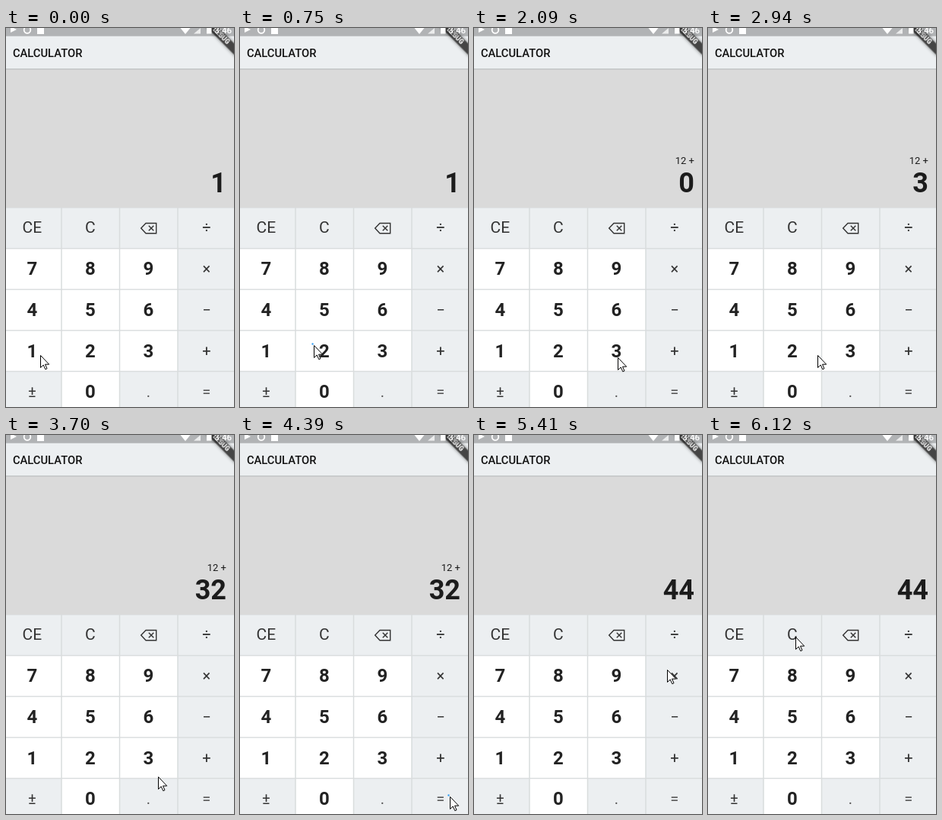
Animation of 300x496 px, one loop 6.29 s. Source, as an HTML page:

```html
<!DOCTYPE html>
<html lang="en">
<head>
<meta charset="utf-8">
<title>Calculator</title>
<style>
  html, body { margin: 0; width: 100%; height: 100%; overflow: hidden; background: #dadada; }
  svg { display: block; width: 300px; height: 496px; font-family: Roboto, sans-serif; }
  .key { text-anchor: middle; fill: #222; }
  .digit { font-size: 24px; font-weight: 700; }
  .clear { font-size: 21px; fill: #333; }
  .op { font-size: 20px; fill: #333; }
  .faint { fill: #555; }
  .display { text-anchor: end; fill: #1c1c1c; }
  .banner { filter: drop-shadow(0 0 2px #0008); }
</style>
</head>
<body>
<svg viewBox="0 0 300 496">
  <rect width="300" height="496" fill="#dadada"/>
  <rect y="52" width="300" height="2.5" fill="#c3c6c7"/>
  <rect width="300" height="53" fill="#eceff1"/>
  <text x="8.9" y="38" font-size="14.75" font-weight="500" fill="#111">CALCULATOR</text>

  <g class="banner" transform="translate(302.5 -9) rotate(45)">
    <rect x="-34" y="22.4" width="68" height="10.2" fill="#454545"/>
    <text y="30.5" font-size="8.4" font-weight="900" text-anchor="middle" fill="#fff">DEBUG</text>
  </g>
  <rect width="300" height="10.7" opacity=".25"/>

  <g fill="#fff">
    <path d="M6 0H10L14 2L6 6Z M41 0H50V8H41Z M229.5 0H242.5L236 8Z M264 0H270.5V7.5H264Z"/>
    <path d="M247 7.5L256 0V7.5Z" opacity=".75"/>
    <circle cx="28" cy="2.5" r="4.3" fill="none" stroke="#fff" stroke-width="1.8"/>
    <text x="297" y="7" font-size="11.5" font-weight="500" text-anchor="end">3:46</text>
  </g>

  <text id="history" class="display" x="290" y="178" font-size="13"></text>
  <text id="value" class="display" x="290" y="215" font-size="36" font-weight="700"></text>

  <rect y="235" width="300" height="261" fill="#d9dcdd"/>
  <g id="keys"></g>
  <path d="M177.7 262L184 255.500H197.700V268.700H184Z M187.800 258.700L194.300 265.300M194.300 258.700L187.800 265.300"
        fill="none" stroke="#333" stroke-width="1.4"/>
  <clipPath id="keyClip"><rect id="clipRect" width="75" height="52.2"/></clipPath>
  <circle id="splash" fill="#2196f3" clip-path="url(#keyClip)"/>
  <path id="cursor" d="M.5 .5V16.5L4.2 13L6.8 18.7L9 17.7L6.5 12.2H11.7Z"
        fill="#fff" stroke="#000" stroke-linejoin="round"/>
</svg>
<script>
const LOOP = 6290, COLS = 4, DISPLAY_DELAY = 140;
const labels = ["CE", "C", "", "÷", ..."789×456−123+±0.="];
const isDigit = label => /\d/.test(label);
const mix = (a, b, p) => a + (b - a) * p;
const el = id => document.getElementById(id);

function setAttributes(id, values) {
  for (const name in values) el(id).setAttribute(name, values[name]);
}

// Pointer moves: leave, arrive, x, y
const moves = [
  [0, 0, 45, 428], [60, 520, 97, 415], [915, 1160, 240, 408], [1240, 1330, 254, 413],
  [1390, 1470, 242, 401], [1620, 1710, 254, 408], [1930, 2080, 189, 431], [2170, 2380, 159, 429],
  [2850, 2930, 144, 428], [3010, 3080, 121, 429], [3480, 3930, 282, 466], [4010, 4240, 276, 473],
  [4630, 5400, 254, 307], [5490, 5880, 115, 264]
];

// Presses: time, key, splash length
const presses = [[750, "2", 400], [1930, "+", 140], [2550, "3", 370], [3330, "2", 400], [4390, "=", 450]];

function keyBox(label) {
  const i = labels.indexOf(label);
  return { x: -2.75 + (i % COLS) * 76.5, y: 235.7 + Math.floor(i / COLS) * 53.6 };
}

el("keys").innerHTML = labels.map(label => {
  const { x, y } = keyBox(label), digit = isDigit(label);
  const kind = digit ? "digit" : label[0] === "C" ? "clear" : "op";
  const faint = "=.".includes(label) ? "faint" : "";
  return `<rect x="${x}" y="${y}" width="75" height="52.2" fill="${digit ? "#fff" : "#eceff1"}"/>
    <text class="key ${kind} ${faint}" x="${x + 37.1}" y="${y + (digit ? 34 : 32.6)}">${label}</text>`;
}).join("");

function pointerAt(t) {
  const i = moves.findLastIndex(([leave]) => leave <= t);
  const [leave, arrive, x, y] = moves[i], [, , fromX, fromY] = moves[Math.max(0, i - 1)];
  const p = Math.min(1, (t - leave) / (arrive - leave || 1));
  return [mix(fromX, x, p), mix(fromY, y, p)];
}

function calculate(t) {
  let history = "", value = "1", sum = 0;
  for (const [time, key] of presses) {
    if (time + DISPLAY_DELAY > t) break;
    if (isDigit(key)) value = String(+(value + key));
    else if (key === "+") [sum, history, value] = [+value, `${value} +`, "0"];
    else [value, history] = [String(sum + +value), ""];
  }
  return [history, value];
}

function drawSplash(t) {
  const press = presses.find(([time, , length]) => t >= time && t < time + length);
  el("splash").style.display = press ? "" : "none";
  if (!press) return;
  const [time, key, length] = press, p = (t - time) / length;
  const { x, y } = keyBox(key), [startX, startY] = pointerAt(time);
  setAttributes("clipRect", { x, y });
  setAttributes("splash", {
    cx: mix(startX - 1.5, x + 37.5, p), cy: mix(startY - 1.5, y + 26, p),
    r: 1.2 + 75 * p * p, opacity: 0.9 * (1 - p) ** 3
  });
}

function draw() {
  const t = performance.now() % LOOP;
  [el("history").textContent, el("value").textContent] = calculate(t);
  setAttributes("cursor", { transform: `translate(${pointerAt(t).map(Math.round)})` });
  drawSplash(t);
  requestAnimationFrame(draw);
}
draw();
</script>
</body>
</html>
```
